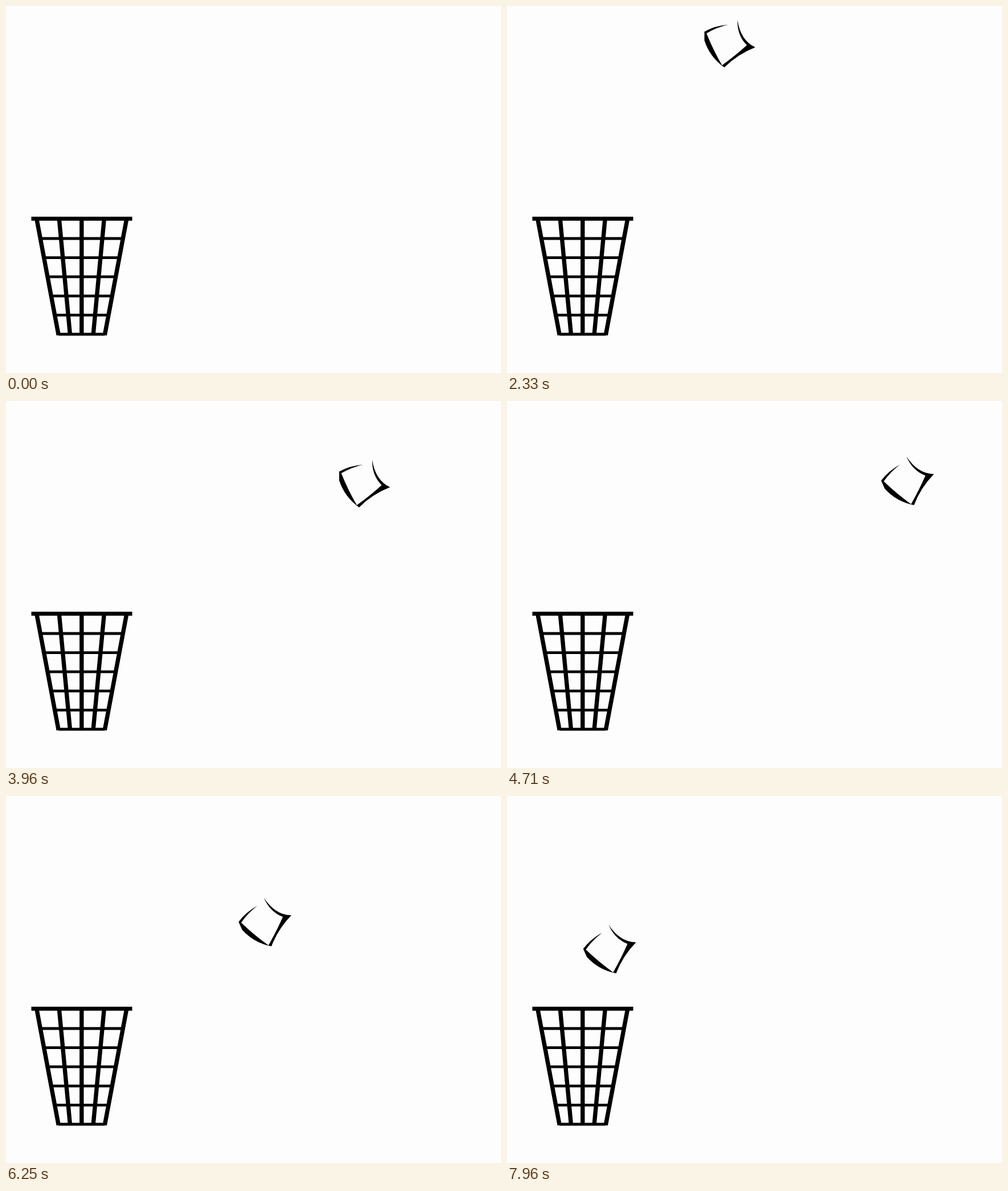
An HTML page that plays this animation: 869 by 644 pixels, repeating every 8 s.

```html
<!DOCTYPE html>
<html lang="en">
<head>
<meta charset="utf-8">
<title>Paper falling towards a basket</title>
<style>
  html, body { margin: 0; width: 100%; height: 100%; overflow: hidden; background: #fdfdfd; }
  svg { display: block; width: 869px; height: 644px; }
</style>
</head>
<body>
<svg viewBox="0 0 869 644">
  <g fill="none" stroke="#000">
    <path d="M44.5 373.3H221.5" stroke-width="7"/>
    <path id="ribs" stroke-width="7.4"/>
    <path id="hoops" stroke-width="4.8"/>
  </g>
  <!-- sheet outline, drawn around its own centre -->
  <path id="sheet" d="M-44.5 -21Q-26 -31.5 -2.5 -33.2Q-23 -28.7 -40.8 -18
    Q-29 11.6 -13.5 38Q11.7 19.6 30 2.8Q12.8 -14.4 13.5 -41.5
    Q19 -5.5 44.8 6.5Q13.4 18.8 -9.5 41.8Q-35 23.8 -44.5 -5.5Z"/>
</svg>
<script>
const LOOP = 8000, FPS = 24;
const $ = id => document.getElementById(id);

// Basket: five ribs converging downwards, hoops between the outer ribs
const MID = 132.8, TOP = 374, BASE = 577.5, GAP = 33.6;
const half = y => 78.9 - 0.1885 * (y - TOP);
const rib = s => `M${MID + s * half(TOP)} ${TOP}L${MID + s * half(BASE)} ${BASE}`;
const hoop = i => {
  const y = TOP + 0.4 + GAP * i, w = half(y);
  return `M${MID - w} ${y}h${2 * w}`;
};
$('ribs').setAttribute('d', [-1, -0.5, 0, 0.5, 1].map(rib).join(''));
$('hoops').setAttribute('d', [1, 2, 3, 4, 5, 6].map(hoop).join(''));

// Flight: a steady glide to the right, then a smooth swing back to the left
const TURN = 100, SPEED = [6.111, 2.022];
const glide = step => [250.5, 19.5].map((p, c) => p + SPEED[c] * (step - 33));
const swing = [
  [TURN, ...glide(TURN)], [108, 704, 146], [113, 706, 140.7],
  [137, 549, 195.9], [164, 359, 244.9], [191, 183, 269.2]
];

function slope(i, c) {
  if (i === 0) return SPEED[c - 1];
  const a = swing[i - 1], b = swing[i + 1] || swing[i];
  return (b[c] - a[c]) / (b[0] - a[0]);
}

function place(step) {
  if (step < TURN) return glide(step);
  let i = 0;
  while (i < swing.length - 2 && step >= swing[i + 1][0]) i++;
  const p = swing[i], q = swing[i + 1], d = q[0] - p[0];
  const u = (step - p[0]) / d, v = 1 - u;
  return [1, 2].map(c => v * v * (1 + 2 * u) * p[c] + u * u * (3 - 2 * u) * q[c]
    + d * u * v * (v * slope(i, c) - u * slope(i + 1, c)));
}

// The sheet tips over while it turns back
function tilt(step) {
  const u = Math.min(1, Math.max(0, (step - TURN) / 12));
  return -24.3 * u * u * (3 - 2 * u);
}

const sheet = $('sheet');
const start = performance.now();

function draw(now) {
  const t = Math.max(0, now - start) % LOOP;
  const step = Math.min(191, Math.floor(t * FPS / 1000 + 0.13));
  sheet.setAttribute('transform', `translate(${place(step)}) rotate(${tilt(step)})`);
  requestAnimationFrame(draw);
}
draw(start);
</script>
</body>
</html>
```
